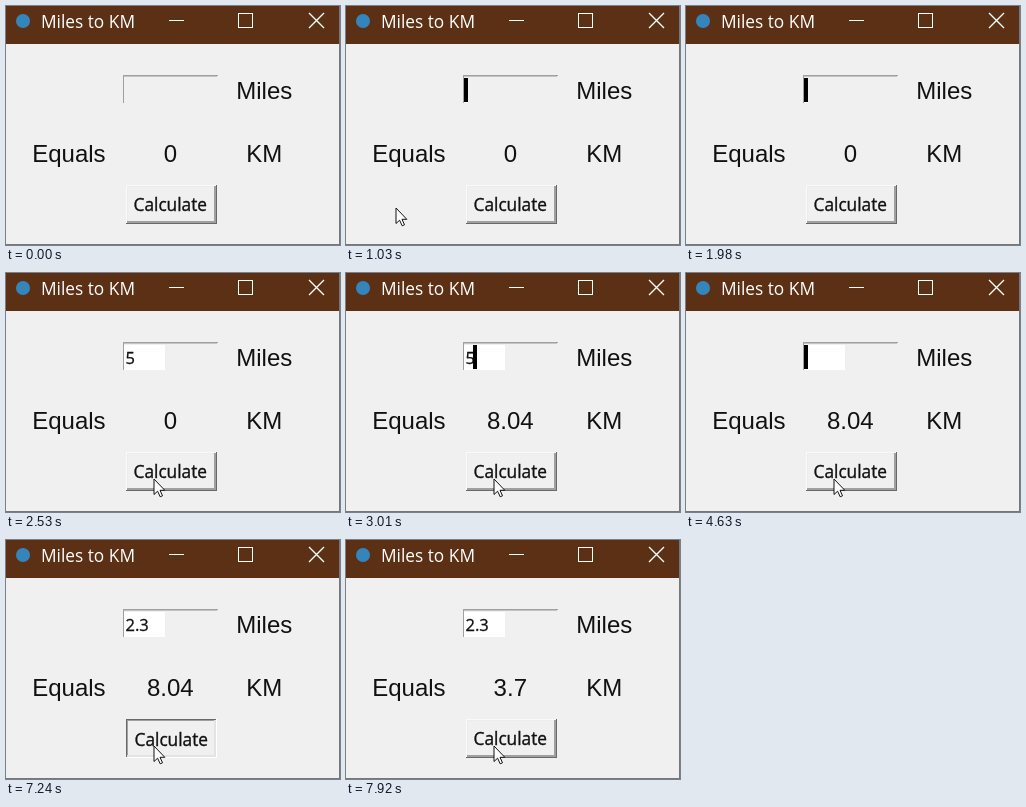
An HTML page with a canvas for the animation above (8 s loop, 334 by 239 pixels).

```html
<!DOCTYPE html>
<html lang="en">
<head>
<meta charset="utf-8">
<title>Miles to KM</title>
<style>
  html, body { margin: 0; width: 100%; height: 100%; overflow: hidden; background: #f0f0f0; }
  canvas { display: block; }
</style>
</head>
<body>
<canvas id="stage" width="334" height="239"></canvas>
<script>
const ctx = document.getElementById('stage').getContext('2d');
const LOOP = 8000;
const KM_PER_MILE = 1.609;
const UI = '"Open Sans", "Noto Sans", sans-serif';
const LABEL = '"Liberation Sans", Arial, sans-serif';
const INK = '#111';

const blink = { start: 130, period: 900, on: 590 };
const field = { x: 118, y: 72, h: 25, caretWidth: 4, paintedAt: 2520, paintedWidth: 41 };

const keystrokes = [
  { time: 2130, text: '5' },
  { time: 4520, text: '' },
  { time: 5690, text: '2' },
  { time: 6290, text: '2.' },
  { time: 6750, text: '2.3' }
];
const clicks = [{ down: 2890, up: 3010 }, { down: 7240, up: 7520 }];

// The pointer glides from one spot to another, rests, then hides.
const glides = [
  { start: 970, stop: 1210, hide: 1210, from: [49, 230], to: [51, 166] },
  { start: 1360, stop: 1760, hide: 1980, from: [38, 166], to: [37, 178] },
  { start: 2130, stop: 2550, hide: LOOP, from: [132, 237], to: [148, 206] }
];

const easeOut = p => 1 - (1 - p) ** 2;
const lerp = (a, b, p) => a + (b - a) * p;

function typedAt(t) {
  const last = keystrokes.filter(k => k.time <= t).pop();
  return last ? last.text : '';
}

function resultAt(t) {
  const click = clicks.filter(c => c.up <= t).pop();
  const miles = click ? Number(typedAt(click.up)) : 0;
  return String(Math.floor(miles * KM_PER_MILE * 100) / 100);
}

function rect(x, y, w, h, color) {
  ctx.fillStyle = color;
  ctx.fillRect(x, y, w, h);
}

function text(str, x, y, size, family, { color = INK, align = 'left', weight = 0 } = {}) {
  ctx.font = `${size}px ${family}`;
  ctx.textAlign = align;
  ctx.fillStyle = ctx.strokeStyle = color;
  ctx.fillText(str, x, y);
  if (weight) {
    ctx.lineWidth = weight;
    ctx.strokeText(str, x, y);
  }
}

function drawTitleBar() {
  rect(0, 0, 334, 38, '#5c3014');
  ctx.fillStyle = '#3585bd';
  ctx.beginPath();
  ctx.arc(17, 15, 7, 0, Math.PI * 2);
  ctx.fill();
  text('Miles to KM', 35, 22, 17.3, UI, { color: '#fff' });

  ctx.strokeStyle = '#fff';
  ctx.lineWidth = 1;
  ctx.strokeRect(232.5, 7.5, 14, 14);
  ctx.beginPath();
  ctx.moveTo(163, 14.5);
  ctx.lineTo(178, 14.5);
  ctx.stroke();
  ctx.lineWidth = 1.4;
  ctx.beginPath();
  for (const side of [-1, 1]) {
    ctx.moveTo(310.5 - 7.5 * side, 7);
    ctx.lineTo(310.5 + 7.5 * side, 22);
  }
  ctx.stroke();
}

function drawEntry(t) {
  const { x, y, h, caretWidth } = field;
  const typed = typedAt(t);
  const advance = [...typed].reduce((sum, c) => sum + (c === '.' ? 4.5 : 9), 0);
  const phase = (t - blink.start) % blink.period;
  const caretOn = t >= blink.start && phase < blink.on;

  rect(117, 69, 95, 1, '#a0a0a0');
  rect(117, 70, 94, 1, '#c4c4c4');
  rect(117, 69, 1, 28, '#a0a0a0');
  if (t >= field.paintedAt) rect(x, y, field.paintedWidth, h, '#fff');
  else if (t >= blink.start) rect(x, y, advance + caretWidth, h, '#fff');
  text(typed, x + 1.5, 90.5, 16.5, UI, { weight: 0.3 });
  if (caretOn) rect(x + advance, y, caretWidth, 24, '#000');
}

function drawButton(down) {
  const [outer, inner, farOuter, farInner] = down
    ? ['#696969', '#a0a0a0', '#fff', '#e3e3e3']
    : ['#fafafa', '#ececec', '#696969', '#a0a0a0'];
  rect(120, 179, 91, 39, farOuter);
  rect(120, 179, 90, 38, outer);
  rect(121, 180, 89, 37, farInner);
  rect(121, 180, 87, 35, inner);
  rect(122, 181, 86, 34, '#f0f0f0');
  const shift = down ? 1 : 0;
  text('Calculate', 127.5 + shift, 204.7 + shift, 17.3, UI, { weight: 0.35 });
}

function drawPointer(t) {
  const glide = glides.find(g => t >= g.start && t < g.hide);
  if (!glide) return;
  const { start, stop, from, to } = glide;
  const p = easeOut(Math.min(1, (t - start) / (stop - start)));
  ctx.save();
  ctx.translate(Math.round(lerp(from[0], to[0], p)), Math.round(lerp(from[1], to[1], p)));
  ctx.fillStyle = '#fff';
  ctx.strokeStyle = INK;
  ctx.lineWidth = 1;
  const arrow = new Path2D('M0 0V15.5L3.6 12.2L6.2 17.8L8.5 16.8L6 11.3H10.8Z');
  ctx.fill(arrow);
  ctx.stroke(arrow);
  ctx.restore();
}

function draw(t) {
  rect(0, 0, 334, 239, '#f0f0f0');
  drawTitleBar();
  rect(333, 0, 1, 239, '#777');
  rect(0, 238, 334, 1, '#777');
  text('Miles', 230.3, 93.3, 24, LABEL);
  text('Equals', 26.2, 156.3, 24, LABEL);
  text(resultAt(t), 164.3, 156.3, 24, LABEL, { align: 'center' });
  text('KM', 240.2, 156.3, 24, LABEL);
  drawEntry(t);
  drawButton(clicks.some(c => t >= c.down && t < c.up));
  drawPointer(t);
}

const begin = performance.now();
function tick() {
  draw((performance.now() - begin) % LOOP);
  requestAnimationFrame(tick);
}
tick();
</script>
</body>
</html>
```
